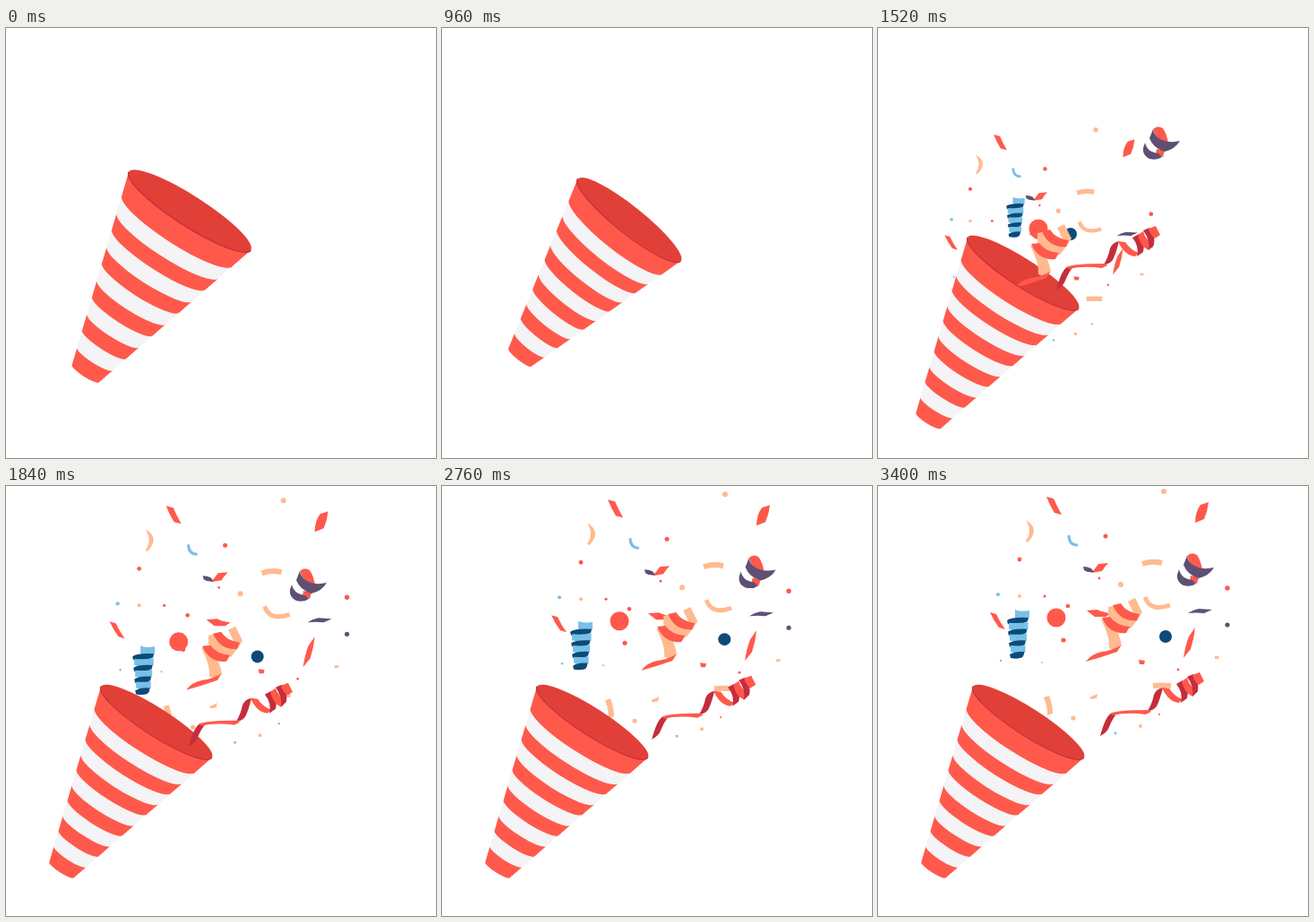
Write an HTML page with a canvas that moves like this. It is 480 px wide and 480 px high and loops after 3.44 s.

```html
<!DOCTYPE html>
<html lang="en">
<head>
<meta charset="utf-8">
<title>Party popper</title>
<style>
html, body { margin: 0; width: 100%; height: 100%; overflow: hidden; background: #fff; }
canvas { display: block; }
</style>
</head>
<body>
<canvas id="stage" width="480" height="480"></canvas>
<script>
const ctx = document.getElementById('stage').getContext('2d');
const LOOP = 3440, STEP = 40;
const RED = '#ff594b', MOUTH = '#e14038', DARK = '#c52d3c', WHITE = '#f4f3f5',
      PEACH = '#ffba90', SKY = '#78c0e8', NAVY = '#0c4a78', PLUM = '#5f5073';

const lerp = (a, b, k) => a + (b - a) * k;
const mix = (p, q, k) => [lerp(p[0], q[0], k), lerp(p[1], q[1], k)];
const part = (t, from, to) => Math.min(1, Math.max(0, (t - from) / (to - from)));
const smooth = k => k * k * (3 - 2 * k);
const easeOut = (k, power = 2) => 1 - (1 - k) ** power;

function fill(color, d) {
  ctx.fillStyle = color;
  ctx.fill(new Path2D(d));
}
function line(color, width, d) {
  ctx.strokeStyle = color;
  ctx.lineWidth = width;
  ctx.stroke(new Path2D(d));
}
function disc(color, x, y, r) {
  ctx.fillStyle = color;
  ctx.beginPath();
  ctx.arc(x, y, r, 0, 7);
  ctx.fill();
}

// Cone: local origin is the centre of the mouth, y runs towards the tip.
const LEN = 196, RIM = 73.6, TIP = 16.3, TILT = 32.7, BULGE = .21;

function coneSpace(pose, draw) {
  ctx.save();
  ctx.translate(...pose.at);
  ctx.rotate((TILT + pose.turn) * Math.PI / 180);
  ctx.scale(pose.size, pose.size);
  ctx.translate(0, -LEN / 2);
  draw();
  ctx.restore();
}
function ring(f, from, to, back) {
  const w = lerp(RIM, TIP, f);
  ctx.ellipse(0, LEN * f, w, w * BULGE, 0, from, to, back);
}
function mouth() {
  ctx.fillStyle = MOUTH;
  ctx.beginPath();
  ring(0, 0, 7);
  ctx.fill();
}
function front() {
  const band = (top, bottom, color) => {
    ctx.fillStyle = color;
    ctx.beginPath();
    ring(top, 0, Math.PI);
    ring(bottom, Math.PI, 0, true);
    ctx.fill();
  };
  // Each band runs slightly under the next one, so no seams show.
  const PITCH = .175, FIRST = .12, WIDTH = .09, LAP = .004;
  band(0, FIRST + LAP, RED);
  for (let i = 0; i < 5; i++) {
    const f = FIRST + PITCH * i;
    band(f, f + WIDTH + LAP, WHITE);
    band(f + WIDTH, i < 4 ? f + PITCH + LAP : 1, RED);
  }
  ctx.strokeStyle = DARK;
  ctx.lineWidth = 1.2;
  ctx.beginPath();
  ring(0, 0, Math.PI);
  ctx.stroke();
}

function conePose(t) {
  const READY = [148, 291], REST = [115, 346];
  if (t < 400) return { at: [147, 295], turn: 0, size: 1.1 };
  const shrink = part(t, 360, 480);
  if (t < 1200) return {
    at: mix([147, 295], READY, shrink),
    turn: 5.8 * Math.cos(2 * Math.PI * (Math.min(t, 1040) - 520) / 146.67),
    size: lerp(1.1, 1, shrink)
  };
  // Recoil past the resting place, then settle.
  const k = t < 1320 ? 1.43 * smooth(part(t, 1160, 1320))
                     : lerp(1.43, 1, smooth(part(t, 1320, 1680)));
  return { at: mix(READY, REST, k), turn: -5.6 * (1 - part(t, 1160, 1280)), size: 1 };
}

// Small confetti, drawn at its final place.
const DOTS = {
  [PEACH]: [[319, 6, 3], [271, 110, 3], [158, 123, 2], [218, 259, 2.6], [293, 268, 2], [183, 197, 1.2]],
  [RED]: [[390, 114, 2.7], [254, 56, 2.5], [158, 82, 2.4], [186, 123, 1.6], [212, 134, 2.3],
          [207, 172, 2.6], [247, 103, 1.4], [335, 205, 1.4], [314, 255, 1]],
  [PLUM]: [[390, 155, 2.6]],
  [SKY]: [[134, 121, 2.1], [265, 276, 1.4], [137, 195, 1.2]]
};
function confetti() {
  for (const color in DOTS) for (const dot of DOTS[color]) disc(color, ...dot);
  fill(RED, `M188 12L196 14Q200 23 205 32L197 30Q192 22 188 12
    M354 41Q354 29 360 21L369 18Q368 28 364 37Z
    M125 141L132 143Q136 152 142 160L135 158Q129 150 125 141
    M341 192Q343 178 347 168L354 158Q353 170 349 182Z
    M238 97Q242 93 246 87L257 86Q253 90 250 95Z
    M233 139L245 138Q251 141 260 142L254 146L242 146Z
    M291 194L298 195L297 199L292 199Z`);
  fill(PLUM, 'M229 90Q234 90 238 92L241 96Q234 97 230 94ZM346 142Q352 138 358 137L373 138L364 142Q355 141 346 142');
  fill(PEACH, `M185 236L191 234Q195 244 195 254L189 256Q189 245 185 236
    M236 236L245 232L244 237L238 238ZM376 190L381 190L380 193L376 193Z
    M165 38Q182 48 167 63L165 61Q173 51 165 38`);
  line(PEACH, 6, 'M295 87Q306 83 317 86M307 223Q317 222 327 223');
  line(PEACH, 5, 'M298 124Q304 141 326 133');
  line(SKY, 3, 'M213 55Q213 66 223 66');
}

function peachCoil() {
  fill(PEACH, `M279 129L287 125L295 141L289 150Z
    M257 135L266 133L290 149L282 159Q264 157 257 145Z
    M249 149L260 150Q270 165 272 178L267 184L258 181Q259 168 249 149`);
  fill(RED, `M262 133L271 131Q277 141 292 143L289 150Q270 152 262 133
    M250 147L259 146Q266 156 281 157L277 164Q258 166 250 147
    M232 196Q239 187 250 185Q260 184 271 178L267 185Q250 191 232 196`);
}
function redStreamer() {
  fill(DARK, `M248 279Q254 257 260 254L268 252Q262 259 258 269Q256 275 248 279
    M301 251Q306 243 308 233Q311 226 318 225Q315 238 311 246Q307 251 301 251`);
  fill(RED, `M259 254Q267 250 303 250L305 252L299 255Q278 252 262 256Z
    M317 225L325 226Q331 235 340 238L336 242Q324 241 317 225`);
  fill(DARK, 'M333 221L340 217Q348 228 345 237L338 242Q341 231 333 221');
  fill(RED, 'M339 218L345 214Q348 224 357 229L351 235Q342 231 339 218');
  fill(DARK, 'M345 213L352 210Q359 219 357 229L351 235Q353 224 345 213');
  fill(RED, 'M351 211L359 208L364 218L358 222Q353 218 351 211');
}
function blueCoil() {
  for (let i = 0; i < 4; i++) {
    const y = 138 + 12.7 * i, x = 144 + i, right = 169 - i * 1.5;
    fill(SKY, `M${x + (i ? 1 : 9)} ${y + (i ? 2 : 0)}Q${x + 14} ${y + 3} ${right} ${y + 1}
      L${right} ${y + 9}Q${x + 14} ${y + 13} ${x + (i ? 1 : 9)} ${y + 9}Z`);
    fill(NAVY, `M${x} ${y + 12}Q${x + 6} ${y + 8} ${right - 1} ${y + 9}
      L${right - 2} ${y + 13}Q${x + 14} ${y + 18} ${x + 1} ${y + 16}Z`);
  }
}
function plumCurl() {
  fill(RED, 'M345 78Q350 73 356 77Q361 84 362 95Q350 92 345 78M349 100L358 102L356 109L348 106Z');
  fill(PLUM, `M345 78C347 88 358 95 375 91Q370 100 358 103Q345 99 341 88Z
    M336 93C338 101 343 104 351 105L355 109Q350 113 341 111Q333 107 334 99Z`);
}

// Offsets are relative to the final place: at 1520 ms, at 1760 ms; then a slow drift home.
const PIECES = [
  { draw: () => disc(RED, 199, 147, 10.5), c: [199, 147], out: [-20, 77], up: [-7, 30], power: 2.2 },
  { draw: () => disc(NAVY, 321, 168, 7), c: [321, 168], out: [-106, 62], up: [-45, 25], power: 2.2 },
  { draw: plumCurl, c: [354, 93], out: [-38, 35], up: [-19, 19], power: 2.2 },
  { draw: blueCoil, c: [156, 165], out: [-3, 46], up: [-3, 43], power: 1.3, size: .82 },
  { draw: peachCoil, c: [264, 161], out: [-79, 94], up: [-33, 34], power: 1.3 },
  { draw: redStreamer, c: [306, 244], out: [-49, 13], up: [-47, 12.5], power: 1.3 }
];

function place(from, at, size, draw) {
  ctx.save();
  ctx.translate(...at);
  ctx.scale(size, size);
  ctx.translate(-from[0], -from[1]);
  draw();
  ctx.restore();
}
function launch(t, { draw, c, out, up, power, size = 1 }) {
  const go = part(t, 1240, 1520), spread = easeOut(part(t, 1520, 1740));
  const drift = easeOut(part(t, 1760, 3400), power);
  const shift = p => [c[0] + p[0], c[1] + p[1]];
  const at = go < 1 ? mix([115, 345], shift(out), go)
                    : shift(mix(mix(out, up, spread), [0, 0], drift));
  place(c, at, go < 1 ? lerp(.2, size, go) : lerp(size, 1, spread), draw);
}
function burst(t) {
  const k = part(t, 1240, 1720), drift = easeOut(part(t, 1760, 3400), 1.3);
  const [x, y] = mix([95, 348], [250, 130], smooth(k));
  place([260, 119], [x + 10 * drift, y - 11 * drift], lerp(.25, 1, easeOut(k)), confetti);
}

function render(t) {
  ctx.fillStyle = '#fff';
  ctx.fillRect(0, 0, 480, 480);
  const pose = conePose(t), fired = t > 1240;
  if (fired) burst(t);
  coneSpace(pose, mouth);
  if (fired) PIECES.forEach(p => launch(t, p));
  coneSpace(pose, front);
}

const start = performance.now();
function tick() {
  const t = (performance.now() - start) % LOOP;
  render(Math.floor(t / STEP) * STEP);
  requestAnimationFrame(tick);
}
tick();
</script>
</body>
</html>
```
